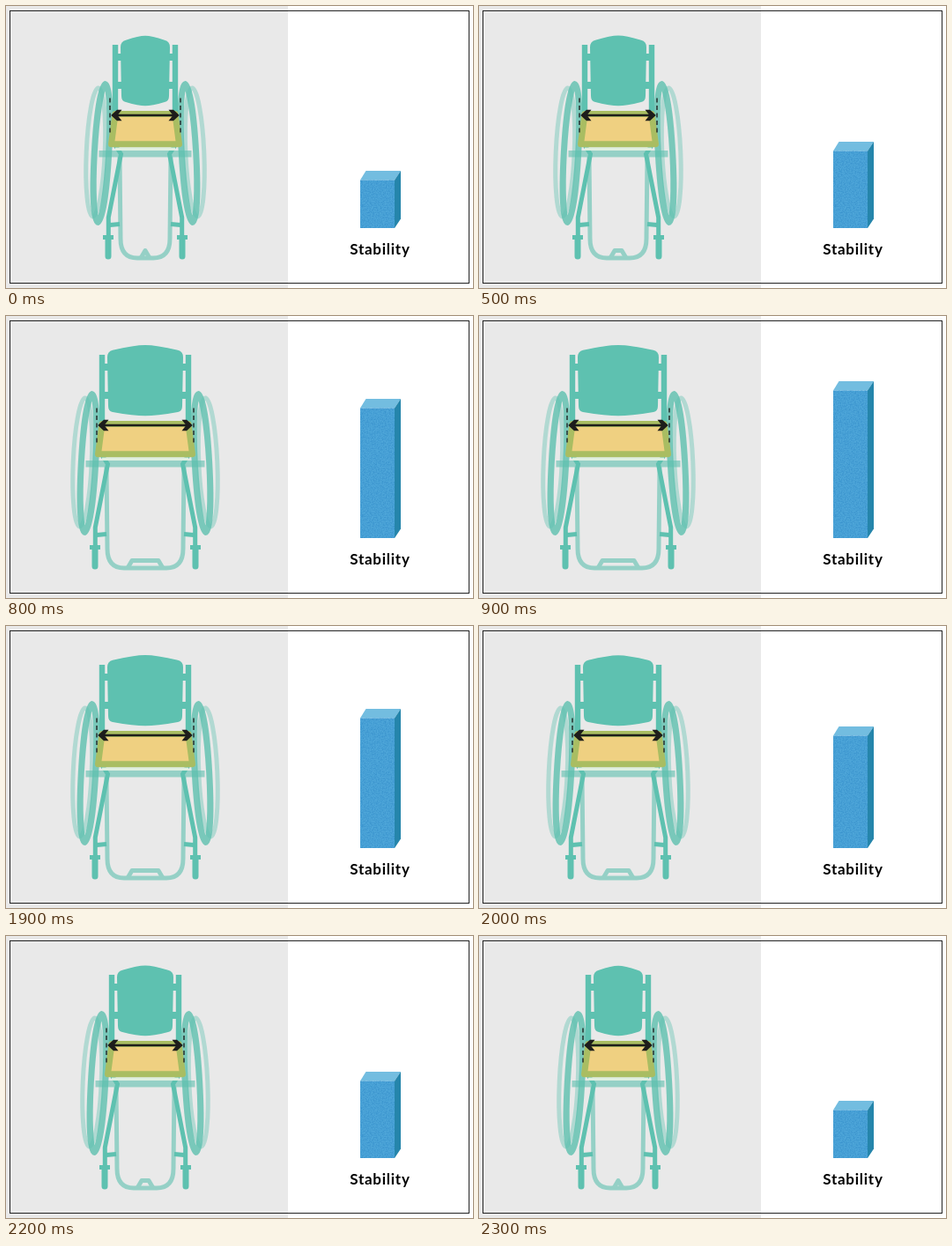
An HTML page that plays this animation: 530 by 320 pixels, repeating every 2800 ms.

```html
<!DOCTYPE html>
<html lang="en">
<head>
<meta charset="utf-8">
<title>Seat width and stability</title>
<style>
  html, body { margin: 0; width: 100%; height: 100%; overflow: hidden; background: #fff; }
  svg { display: block; width: 530px; height: 320px; }
  text { font: bold 17px Lato, sans-serif; letter-spacing: .75px; }
</style>
</head>
<body>
<svg viewBox="0 0 530 320">
  <defs>
    <filter id="grain" color-interpolation-filters="sRGB" x="0" y="0" width="1" height="1">
      <feTurbulence type="fractalNoise" baseFrequency=".7" numOctaves="2" seed="4"/>
      <feColorMatrix values="0 0 0 0 .22  0 0 0 0 .57  0 0 0 0 .8  2 0 0 0 -.7"/>
      <feComposite in2="SourceGraphic" operator="in" result="specks"/>
      <feMerge><feMergeNode in="SourceGraphic"/><feMergeNode in="specks"/></feMerge>
    </filter>
  </defs>
  <rect width="320" height="320" fill="#e9e9e9"/>
  <rect x="4.5" y="5.5" width="521" height="309" fill="none" stroke="#222"/>
  <g id="chair" transform="translate(158 0)" fill="none" stroke="#5ec1b0"></g>
  <g id="block"></g>
  <text x="390.2" y="282">Stability</text>
</svg>
<script>
const LOOP = 2800, STEP = 100;
const spread = [0, 4, 9, 12, 15, 18];
const blockTop = [187, 154, 134, 114, 94, 74];
const chair = document.getElementById('chair');
const block = document.getElementById('block');

// Left-hand parts, measured from the chair's centre line
const wheels = `
  <ellipse rx="10.5" ry="73" transform="translate(-56.3 166) rotate(2.5)" stroke-width="5" opacity=".4"/>
  <ellipse rx="8.2" ry="78.5" transform="translate(-49.5 167) rotate(3.2)" stroke-width="7" opacity=".8"/>`;
const posts = `
  <path d="M-34 44V122" stroke-width="6.4"/>
  <path d="M-32 58H-26M-32 90H-26" stroke-width="8"/>
  <path d="M-36 155L-27.500 168L-41.700 240V262M-40 248.500L-29 247.500" stroke-width="5"/>
  <path d="M-48 262.500H-36" stroke-width="5"/>
  <path d="M-42 263V284" stroke-width="7" stroke-linecap="round"/>`;
const arrowEnd = `
  <path d="M-40 104.500V144" stroke="#222" stroke-width="1.400" stroke-dasharray="5 3.500"/>
  <path d="M-38.800 124L-32 117.800H-26.500L-31.500 124L-26.500 130.200H-32Z" fill="#1d1d1b" stroke="none"/>`;

const mirrored = (part, d) => {
  const side = `<g transform="translate(${-d})">${part}</g>`;
  return side + `<g transform="scale(-1 1)">${side}</g>`;
};
const trapezoid = (top, y1, bottom, y2) => `M${-top} ${y1}H${top}L${bottom} ${y2}H${-bottom}Z`;

function drawChair(d) {
  const w = 28 + d, c = w - 6, peak = 33.8 - d / 22;
  const leg = 28 + d, bend = 9 + d;
  chair.innerHTML = mirrored(wheels, d) + `
    <g opacity=".6" stroke-width="5">
      <path d="M${-52.5 - d} 167.700H${52.5 + d}" stroke-width="7.500"/>
      <path d="M${-leg - 1} 171L${-leg} 264Q${-leg} 286 ${-bend} 286H${bend}Q${leg} 286 ${leg} 264L${leg + 1} 171"/>
      <path d="M${-5 - d} 286L${-d} 277.500H${d}L${5 + d} 286" stroke-linejoin="round"/>
    </g>` + mirrored(posts, d) + `
    <path d="M${-w} 47Q${-w} 40 ${-c} 38.800Q${-c / 3} ${peak} 0 ${peak}T${c} 38.800Q${w} 40 ${w} 47
      L${w - 1} 102Q${w - 1} 108 ${c} 109Q${c / 3} 113.300 0 113.300T${-c} 109Q${1 - w} 108 ${1 - w} 102Z"
      fill="#5ec1b0" stroke="none"/>
    <path d="M${-34 - d} 162.300H${34 + d}" stroke="#dfefe0" stroke-width="3.500"/>
    <path d="${trapezoid(34 + d, 122.5, 38.5 + d, 156.8)}" fill="#efd081" stroke="#a9bd62"
      stroke-width="7" stroke-linejoin="round"/>
    <path d="M${-33 - d} 124H${33 + d}" stroke="#1d1d1b" stroke-width="2.400"/>` + mirrored(arrowEnd, d);
}

function drawBlock(top) {
  const edge = top + 10.5;
  block.innerHTML = `
    <path d="M402 ${edge}L408.500 ${top}H448L441 ${edge}Z" fill="#73bde0"/>
    <path d="M441 ${edge}L448 ${top}V241.500L441 252Z" fill="#2585ab"/>
    <path d="M402 ${edge}H441V252H402Z" fill="#4ea6d9" filter="url(#grain)"/>`;
}

const steps = ms => Math.max(0, Math.min(5, Math.floor(ms / STEP)));
let shown = -1;

function frame() {
  const t = performance.now() % LOOP;
  const pose = steps(t - 400) - steps(t - 1800);
  if (pose !== shown) {
    shown = pose;
    drawChair(spread[pose]);
    drawBlock(blockTop[pose]);
  }
  requestAnimationFrame(frame);
}
frame();
</script>
</body>
</html>
```
